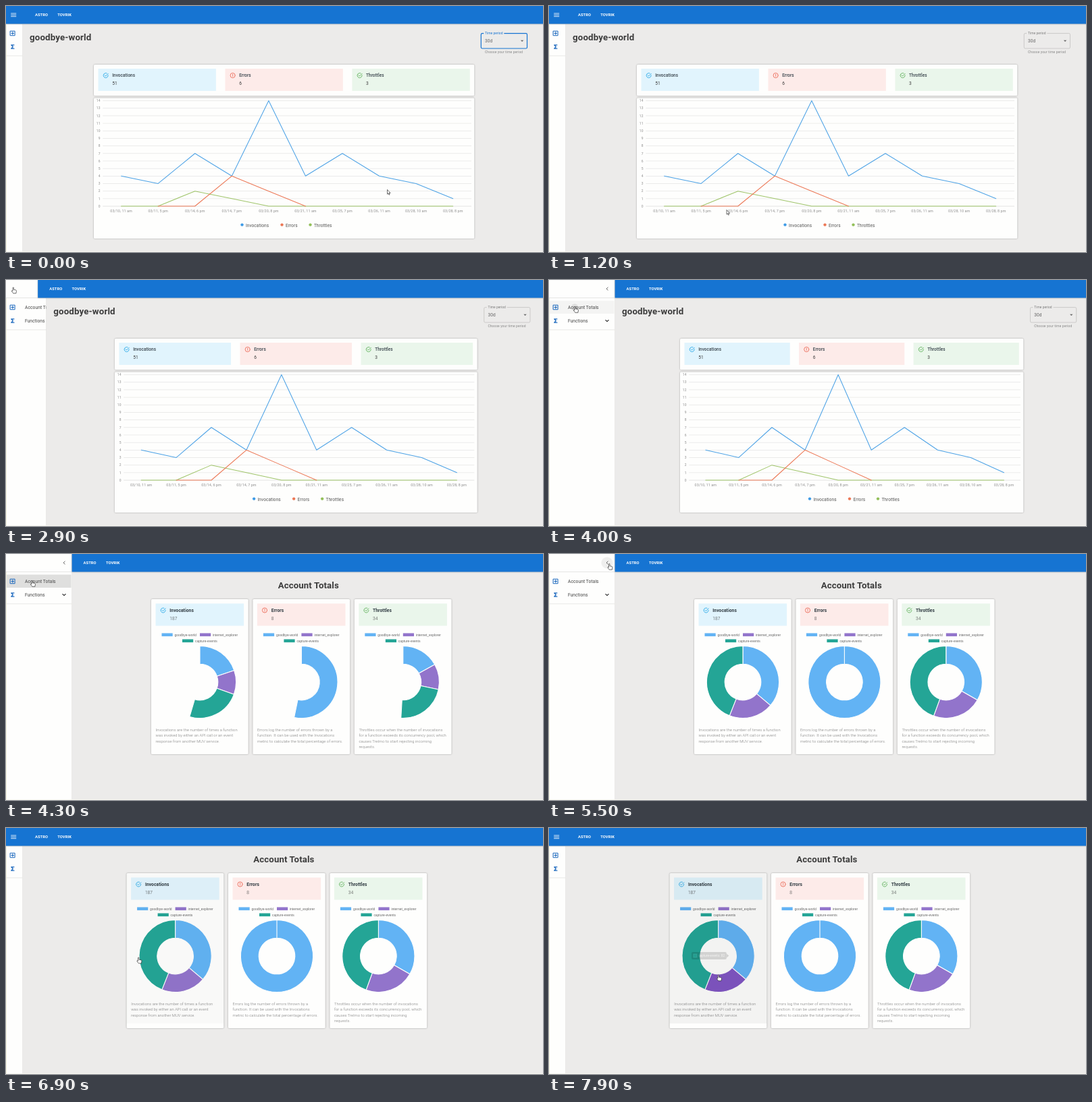
An HTML page that plays this animation: 795 by 365 pixels, repeating every 8 s.

```html
<!DOCTYPE html>
<html lang="en">
<head>
<meta charset="utf-8">
<title>Function dashboard</title>
<style>
  html, body { margin: 0; width: 100%; height: 100%; overflow: hidden; background: #ecebea; }
  svg { display: block; font-family: Roboto, sans-serif; }
  .card { fill: #fefefd; filter: drop-shadow(0 .7px .8px rgba(0, 0, 0, .32)); }
  .bar { fill: #1674d2; filter: drop-shadow(0 .6px .8px rgba(0, 0, 0, .3)); }
  .line { fill: none; stroke-linecap: round; stroke-linejoin: round; }
</style>
</head>
<body>
<svg id="stage" width="795" height="365" viewBox="0 0 795 365"></svg>
<script>
const LOOP = 8000, STEP = 100;
const BLUE = '#1674d2', INK = '#3c3c3c';
const STATS = [
  { name: 'Invocations', tint: '#e1f4fd', tone: '#1fa4e6', recent: 51, total: 187, parts: [.362, .198, .44], begin: 4121,
    note: ['Invocations are the number of times a function', 'was invoked by either an API call or an event', 'response from another MUV service.'] },
  { name: 'Errors', tint: '#fdebe9', tone: '#ea5f4b', recent: 6, total: 8, parts: [1], begin: 4127,
    note: ['Errors log the number of errors thrown by a', 'function. It can be used with the Invocations', 'metric to calculate the total percentage of errors.'] },
  { name: 'Throttles', tint: '#eaf6eb', tone: '#58ad52', recent: 3, total: 34, parts: [3 / 9, 2 / 9, 4 / 9], begin: 4137,
    note: ['Throttles occur when the number of invocations', 'for a function exceeds its concurrency pool, which', 'causes Trelmo to start rejecting incoming', 'requests.'] }
];
const SLICES = ['#62b3f4', '#9274cb', '#24a596'];
const FUNCS = [['goodbye-world', 15.5, 119.8], ['internet_explorer', 72, 119.8], ['capture-events', 46, 128.8]];
const DATES = ['03/10, 11 am', '03/11, 5 pm', '03/14, 6 pm', '03/14, 7 pm', '03/20, 8 pm',
  '03/21, 11 am', '03/25, 7 pm', '03/26, 11 am', '03/28, 10 am', '03/28, 8 pm'];
const SERIES = [
  { color: '#4ea3e6', from: 0, data: [4, 3, 7, 4, 14, 4, 7, 4, 3, 1] },
  { color: '#a0c56b', from: 0, data: [0, 0, 2, 1, 0, 0, 0, 0, 0, 0] },
  { color: '#ec7856', from: 1, data: [0, 0, 4, 2, 0] }
];
const LEGEND = [['Invocations', 349.5, '#3f9be6'], ['Errors', 408.5, '#ec7856'], ['Throttles', 450.5, '#93c05a']];
// time, x, y
const POINTER = [[0, 564.5, 272.5], [200, 564.5, 272.5], [900, 264, 302], [1000, 263, 302.5], [1200, 263, 302.5],
  [2000, 3, 47], [2300, 7.5, 20], [2450, 10, 11], [2900, 10, 11], [3100, 16, 28], [3250, 16, 28], [3700, 38, 39.5],
  [4850, 38, 39.5], [5500, 88.5, 14.5], [6250, 88.5, 14.5], [6900, 195.5, 192], [7000, 195.5, 192], [7800, 250, 218]];
const HAND = [[2400, 3000], [3400, 5000], [5400, 6300], [6800, LOOP]];

const clamp = v => Math.max(0, Math.min(1, v));
const mix = (a, b, k) => a + (b - a) * k;
const smooth = k => k * k * (3 - 2 * k);
const ramp = (t, a, b) => clamp((t - a) / (b - a));
const within = (t, a, b) => t >= a && t < b;

function track(keys, t) {
  const i = keys.findIndex(k => k[0] > t);
  if (i < 0) return keys[keys.length - 1].slice(1);
  const a = keys[i - 1], b = keys[i], k = smooth(ramp(t, a[0], b[0]));
  return [mix(a[1], b[1], k), mix(a[2], b[2], k)];
}

const rect = (x, y, w, h, fill, more = '') =>
  `<rect x="${x}" y="${y}" width="${w}" height="${h}" fill="${fill}" ${more}/>`;
const card = (x, y, w, h) => `<rect class="card" x="${x}" y="${y}" width="${w}" height="${h}" rx="1.6"/>`;
const disc = (x, y, r, fill, more = '') => `<circle cx="${x}" cy="${y}" r="${r}" fill="${fill}" ${more}/>`;
const line = (d, color, width, more = '') =>
  `<path class="line" d="${d}" stroke="${color}" stroke-width="${width}" ${more}/>`;
const at = (x, y, body) => `<g transform="translate(${x} ${y})">${body}</g>`;
const text = (x, y, s, size, fill = INK, weight = 400, more = '') =>
  `<text x="${x}" y="${y}" font-size="${size}" fill="${fill}" font-weight="${weight}" letter-spacing="${size * .01}" ${more}>${s}</text>`;

function statusIcon(x, y, stat) {
  return at(x, y, stat.name === 'Errors'
    ? line('M3.6 0A3.6 3.6 0 1 1 -3.6 0A3.6 3.6 0 1 1 3.6 0M0 -1.8V.4M0 1.7V1.8', stat.tone, .8)
    : line('M3.5 -.2A3.5 3.5 0 1 1 1.4 -3.2M-1.6 -.3L-.2 1.1L3.6 -2.7', stat.tone, .85));
}

function select(x, focused) {
  const edge = focused ? BLUE : '#bdbcbb', label = focused ? BLUE : '#7b7b7b';
  return rect(x, 40.6, 68.2, 22.4, 'none', `rx="1.8" stroke="${edge}" stroke-width="${focused ? 1.2 : .7}"`)
    + rect(x + 4, 39, 30, 3.4, '#ecebea')
    + text(x + 5.7, 41.7, 'Time period', 4.9, label)
    + text(x + 5.7, 54, '30d', 6.6, '#666')
    + `<path d="M${x + 58.6} 50.8h4.4l-2.2 2.3z" fill="#666"/>`
    + text(x + 5.7, 70, 'Choose your time period', 4.9, '#858585', 400, 'style="letter-spacing:.14px"');
}

function statRow(left, right) {
  const w = mix(174.4, 156.2, (left - 130) / 64), gap = (right - left - 13 - w) / 2;
  return card(left, 87, right - left, 46) + STATS.map((s, i) => {
    const x = left + 6.5 + i * gap;
    return rect(x, 93, w, 33, s.tint) + statusIcon(x + 11.2, 103, s)
      + text(x + 20.7, 105, s.name, 6.4, '#37424a', 500)
      + text(x + 20.7, 117.4, s.recent, 6.6, INK);
  }).join('');
}

function lineChart(left, right, shift) {
  const x0 = left + 13.3, x1 = right - 4.3, gap = (x1 - x0) / DATES.length;
  const px = i => x0 + gap * (i + .5), py = v => 297 - v * 11.18;
  let out = card(left, 136.5, right - left, 208.5);
  for (let v = 0; v <= 14; v++) {
    out += rect(x0, py(v) - .3, x1 - x0, .7, v ? '#e4e4e3' : '#d8d8d7')
      + text(left + 9.6, py(v) + 1.8, v, 5, '#8d8d8d', 400, 'text-anchor="end"');
  }
  DATES.forEach((d, i) => out += text(px(i), 305.8, d, 5.4, '#8d8d8d', 400, 'text-anchor="middle"'));
  for (const s of SERIES) {
    out += line('M' + s.data.map((v, i) => `${px(i + s.from)} ${py(v)}`).join('L'), s.color, 1.05);
  }
  for (const [name, x, color] of LEGEND) {
    out += disc(x + shift, 324.6, 2.2, color) + text(x + shift + 5.4, 327.6, name, 6.5, '#555');
  }
  return out;
}

function functionPage(t, open) {
  const left = mix(130, 194, open), right = mix(693.3, 702.3, open);
  return text(mix(35, 108, open), 51, 'goodbye-world', 13.3, INK, 700)
    + select(mix(703.3, 712.5, open), t < 200)
    + statRow(left, right) + lineChart(left, right, 36.5 * open);
}

function slice(cx, cy, a, b, fill) {
  const R = 53.6, r = 26.8, big = b - a > .5 ? 1 : 0;
  const p = (rad, k) => `${cx + rad * Math.sin(k * 2 * Math.PI)} ${cy - rad * Math.cos(k * 2 * Math.PI)}`;
  return `<path d="M${p(R, a)}A${R} ${R} 0 ${big} 1 ${p(R, b)}L${p(r, b)}A${r} ${r} 0 ${big} 0 ${p(r, a)}Z" `
    + `fill="${fill}" stroke="#fefefd" stroke-width="1.1" stroke-linejoin="round"/>`;
}

function doughnut(cx, t, stat, hot) {
  const grow = 1 - (1 - ramp(t, stat.begin, stat.begin + 1000)) ** 4;
  let a = 0, out = '';
  if (!grow) return out;
  stat.parts.forEach((part, i) => {
    const b = Math.min(a + part * grow, .99999);
    out += slice(cx, 190, a, b, hot === i ? '#8156c3' : SLICES[i]);
    a = b;
  });
  return out;
}

function totalsCard(x, t, stat, i) {
  const sans = 'style="font-family:\'Liberation Sans\',sans-serif;letter-spacing:0"';
  let out = card(x, 67, 143.7, 230) + rect(x + 6.5, 73.5, 130.6, 33, stat.tint)
    + statusIcon(x + 17.6, 83.5, stat)
    + text(x + 27.3, 85.8, stat.name, 6.7, '#2f3a41', 700)
    + text(x + 27.3, 98.4, stat.total, 6.6, '#444', 300);
  FUNCS.forEach(([name, dx, y], n) => {
    out += rect(x + dx, y - 2.3, 16.2, 4.6, SLICES[n]) + text(x + dx + 19, y + 1.8, name, 4.95, '#666', 400, sans);
  });
  out += doughnut(x + 72, t, stat, i === 0 && t >= 7900 ? 1 : -1);
  stat.note.forEach((s, n) => out += text(x + 6.6, 263 + n * 8.4, s, 5.8, '#777', 300));
  if (i === 0) {
    out += rect(x, 67, 143.7, 223, '#000', `opacity="${.045 * ramp(t, 6800, 7050)}"`);
    if (t >= 7900) out += tooltip(x + 32.3);
  }
  return out;
}

const tooltip = x => `<g opacity=".13">${rect(x, 184, 52, 11, '#000', 'rx="2"')}`
  + `<path d="M${x + 52} 186.5l3.5 3l-3.5 3z"/>`
  + rect(x + 3, 187, 5, 5, SLICES[2], 'stroke="#fff" stroke-width=".6"')
  + text(x + 10, 191.3, 'capture-events: 82', 4.7, '#fff') + '</g>';

function totalsPage(t, open) {
  const shift = 36.4 * open;
  return text(411.4 + shift, 51, 'Account Totals', 13.2, INK, 700, 'text-anchor="middle"')
    + STATS.map((s, i) => totalsCard(178.6 + shift + i * 150.4, t, s, i)).join('');
}

function drawer(t, width) {
  let out = rect(0, 0, width, 365, '#fefefd');
  if (within(t, 5400, 6200)) {
    out += disc(86, 13, 8.6, '#000', 'opacity=".06"');
    if (t >= 6100) out += disc(86, 13, 6, '#000', 'opacity=".08"');
  }
  out += line('M87.2 10.9L85.1 13L87.2 15.1', '#555', .9) + rect(0, 26.3, width, .7, '#dcdcdb');
  if (within(t, 3500, 5000)) {
    const r = 3 + 95 * smooth(ramp(t, 3950, 4500));
    out += `<svg x="1" y="30.5" width="95.5" height="19.5">${rect(0, 0, 96, 20, '#000', 'opacity=".04"')}`
      + (t > 3950 ? disc(37, 10, r, '#000', `opacity="${.085 * (1 - ramp(t, 4400, 4900))}"`) : '') + '</svg>';
  }
  out += at(9.8, 40.5, line('M-3.3 -3.3H3.3V3.3H-3.3ZM-1.9 0H1.9M0 -1.9V1.9', '#1866bd', 1))
    + at(9.8, 60.5, line('M2.1 -2.7H-2L.5 0L-2 2.7H2.1', '#1866bd', 1.3))
    + text(28, 42.7, 'Account Totals', 6.7, '#444') + text(28, 62.7, 'Functions', 6.6, '#444')
    + line('M83.9 59.5L86 61.6L88.1 59.5', '#333', 1.1)
    + rect(0, 73.6, width, .7, '#dcdcdb') + rect(width - .6, 0, .6, 365, '#dcdcdb');
  return `<svg width="${width}" height="365">${out}</svg>`;
}

function appBar(left, opened) {
  const x = left + (opened ? 17 : 43);
  return `<rect class="bar" x="${left}" y="0" width="${800 - left}" height="26.5"/>`
    + (opened ? '' : line('M7.6 11H14.8M7.6 13.3H14.8M7.6 15.6H14.8', '#fff', .85, `transform="translate(${left} 0)"`))
    + text(x, 15.1, 'ASTRO', 5.8, '#fff', 700) + text(x + 33.3, 15.1, 'TOVRIK', 5.8, '#fff', 700);
}

function pointer(t) {
  const [x, y] = track(POINTER, t);
  const hand = HAND.some(([a, b]) => within(t, a, b));
  const shape = hand
    ? 'M0 .7A.75 .75 0 0 1 1.5 .7V3.3L4.5 3.9Q5.5 4.2 5.4 5.3L4.9 8.8H.8L-1.6 5.7Q-1.8 4.7 -.9 4.6L0 5.4Z'
    : 'M0 0V6.7L1.5 5.4L2.5 7.7L3.5 7.3L2.5 5H4.6Z';
  return at(x, y, `<path d="${shape}" fill="#fff" stroke="#222" stroke-width=".65" stroke-linejoin="round"/>`);
}

function scene(t) {
  const open = smooth(ramp(t, 2790, 3015)) - smooth(ramp(t, 6130, 6325));
  const opened = within(t, 2790, 6130);
  return rect(0, 0, 795, 365, '#ecebea')
    + (t < 4110 ? functionPage(t, open) : totalsPage(t, open))
    + drawer(t, mix(24.6, 97.6, open)) + appBar(97.6 * open, opened)
    + rect(0, 27, .8, 338, '#f3f0d6') + rect(0, 364, 795, 1, '#faf9f2')
    + pointer(t);
}

const stage = document.getElementById('stage');
const start = performance.now();
let shown = -1;
function tick() {
  const t = Math.floor((performance.now() - start) % LOOP / STEP) * STEP;
  if (t !== shown) stage.innerHTML = scene(shown = t);
  requestAnimationFrame(tick);
}
tick();
</script>
</body>
</html>
```
